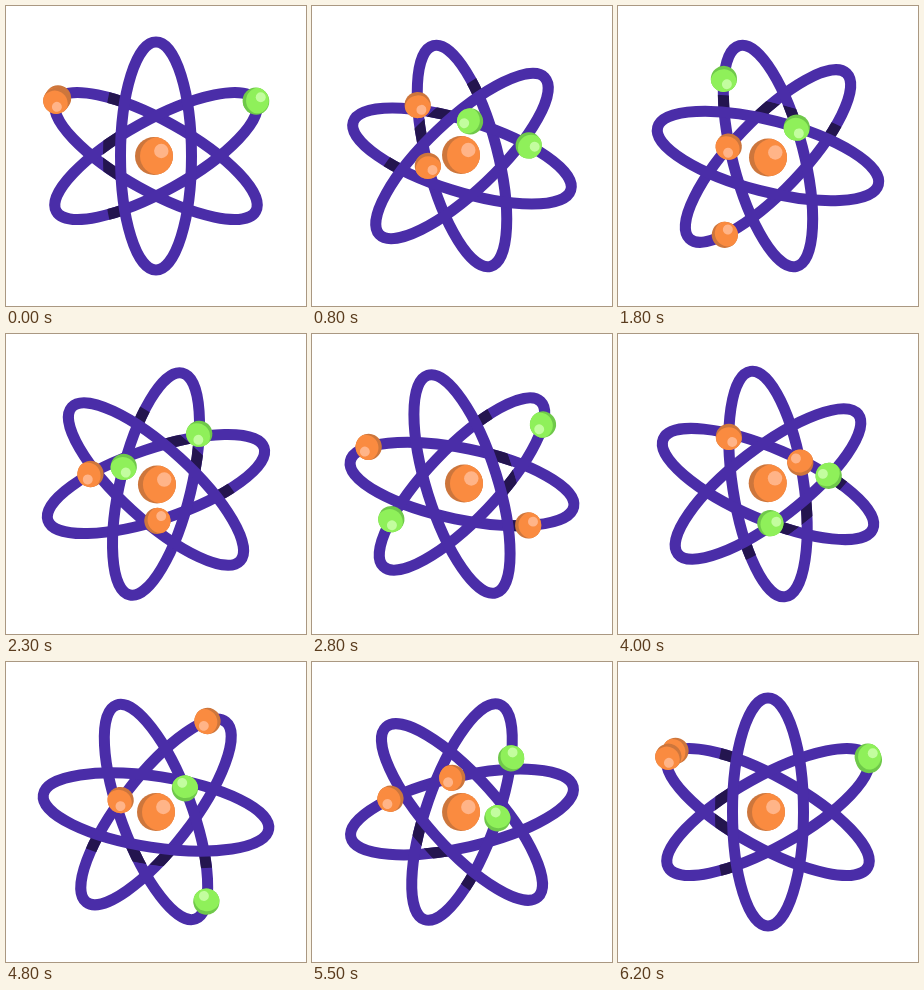
Recreate the animation shown at these times as an HTML page. Size 300x300 px, loop 6.23 s.

```html
<!DOCTYPE html>
<html lang="en">
<head>
<meta charset="utf-8">
<title>Atom</title>
<style>
  html, body { margin: 0; width: 100%; height: 100%; overflow: hidden; background: #fff; }
  svg { display: block; width: 100vw; height: 100vh; }
  .ring { fill: none; stroke: #4a2da8; stroke-width: 11; }
  .shade .ring { stroke: #24154f; }
  .orange { --dark: #cd763c; --lit: #fa8b40; --shine: #ffb488; }
  .green { --dark: #6fc84a; --lit: #8ff05a; --shine: #c3fd9f; }
</style>
</head>
<body>
<svg viewBox="0 0 300 300">
  <defs>
    <path id="orbit" d="M114 0A114 35.5 0 0 0 -114 0A114 35.5 0 0 0 114 0Z"/>
    <clipPath id="disc"><circle r="19"/></clipPath>
    <clipPath id="crescent">
      <path d="M-12 -119.5A41 119.5 0 0 0 -12 119.5L0 114A35.5 114 0 0 1 0 -114Z"/>
    </clipPath>
    <g id="ball">
      <circle r="19" style="fill:var(--dark)"/>
      <circle cx="5" cy="0" r="19" clip-path="url(#disc)" style="fill:var(--lit)"/>
      <circle cx="7.3" cy="-5" r="7.2" style="fill:var(--shine)"/>
    </g>
    <g id="tilted">
      <use href="#orbit" transform="rotate(-151)"/>
      <use href="#orbit" transform="rotate(-29)"/>
    </g>
  </defs>
  <g id="atom">
    <use class="ring" href="#tilted"/>
    <g class="shade" clip-path="url(#crescent)"><use class="ring" href="#tilted"/></g>
    <use class="ring" href="#orbit" transform="rotate(-90)"/>
    <g id="electrons"></g>
  </g>
  <use id="nucleus" class="orange" href="#ball"/>
</svg>
<script>
const LOOP = 6230, TURN = 6200;
const byId = id => document.getElementById(id);
const orbit = byId('orbit');
const lap = orbit.getTotalLength();

// Each electron circles its orbit; the fast ones trail slightly behind two laps.
// Those that steer turn with their path, the others only with the atom.
const electrons = [
  { color: 'orange', tilt: -151, laps: 2, steers: true, lag: p => 3 + 6.5 * p ** 4 },
  { color: 'green', tilt: -29, laps: 2, steers: true, lag: p => 1 + 2.5 * p },
  { color: 'orange', tilt: -151, laps: 1, steers: true, lag: () => 0 },
  { color: 'green', tilt: -29, laps: 1, steers: false, lag: () => 0 }
];
for (const e of electrons) {
  e.node = document.createElementNS('http://www.w3.org/2000/svg', 'use');
  e.node.setAttribute('href', '#ball');
  e.node.setAttribute('class', e.color);
  byId('electrons').append(e.node);
}

// Nucleus drift: time, x, y
const drift = [
  [0, 148, 150], [800, 149, 149], [1800, 150, 151.5], [2800, 152, 149.5],
  [4000, 149.7, 149.3], [4800, 150, 150], [6200, 148, 150]
];

function nucleusAt(t) {
  const i = Math.max(1, drift.findIndex(k => k[0] >= t));
  const [t0, x0, y0] = drift[i - 1], [t1, x1, y1] = drift[i];
  const k = (1 - Math.cos(Math.PI * (t - t0) / (t1 - t0))) / 2;
  return [x0 + (x1 - x0) * k, y0 + (y1 - y0) * k];
}

const pointAt = s => orbit.getPointAtLength(((s % lap) + lap) % lap);

function headingAt(s) {
  const back = pointAt(s - 1), ahead = pointAt(s + 1);
  return Math.atan2(ahead.y - back.y, ahead.x - back.x) * 180 / Math.PI;
}

function draw(t) {
  const p = t / TURN;
  byId('atom').setAttribute('transform', `translate(150 150) rotate(${360 * p})`);
  for (const e of electrons) {
    const s = lap * e.laps * p - e.lag(p);
    const at = pointAt(s);
    const facing = e.steers ? headingAt(s) : -e.tilt;
    e.node.setAttribute('transform',
      `rotate(${e.tilt}) translate(${at.x} ${at.y}) rotate(${facing}) scale(.69)`);
  }
  byId('nucleus').setAttribute('transform', `translate(${nucleusAt(t)})`);
}

// 25 poses per second shown on a 30 Hz clock
const poseTime = t => Math.floor(Math.floor((t + 0.5) * 0.03) * 5 / 6) * 40;

const start = performance.now();
function tick() {
  const t = (performance.now() - start) % LOOP;
  draw(Math.min(poseTime(t), TURN));
  requestAnimationFrame(tick);
}
tick();
</script>
</body>
</html>
```
